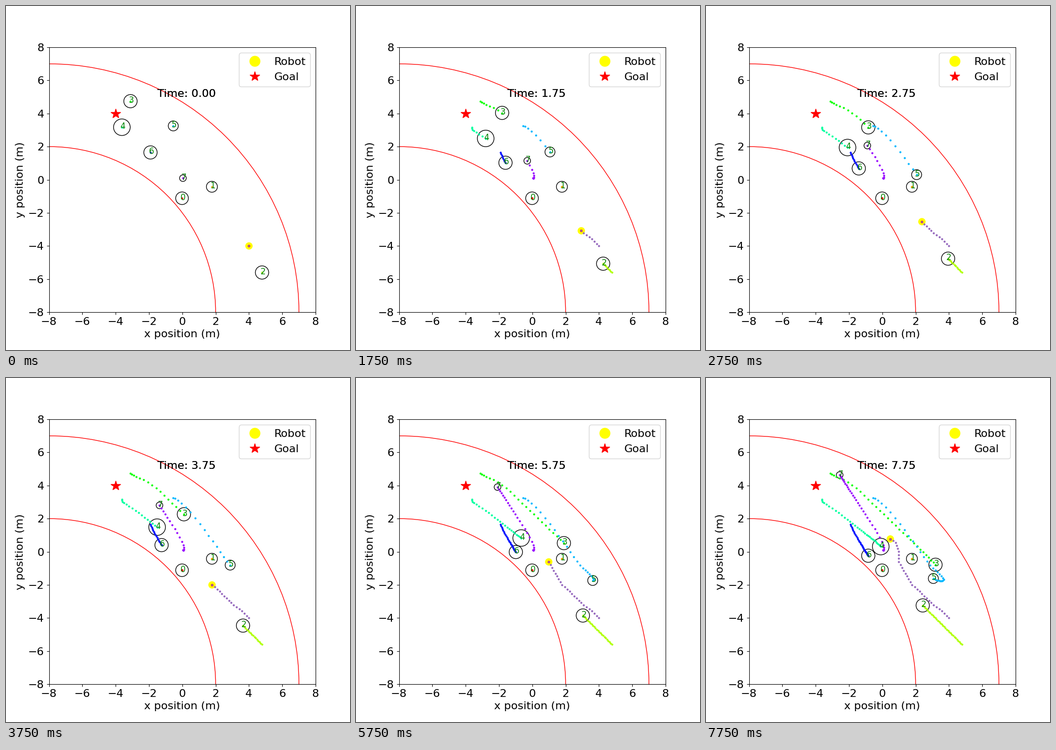
Animation, 700 px wide and 700 px high, one loop 8 s. Source, as a matplotlib script:

```python
import matplotlib.pyplot as plt
import numpy as np
from matplotlib.animation import FuncAnimation
from matplotlib.lines import Line2D
from matplotlib.patches import Circle

FRAMES, STEP = 32, 0.25
CLOCK = np.arange(FRAMES) * STEP
plt.rcParams["font.family"] = "DejaVu Sans"


def smooth(t, knots, values):
    """Cubic Hermite curve through the waypoints."""
    slope = np.gradient(values, knots, edge_order=2)
    i = np.clip(np.searchsorted(knots, t, side="right") - 1, 0, len(knots) - 2)
    h = knots[i + 1] - knots[i]
    u = (t - knots[i]) / h
    return ((1 + 2 * u) * (1 - u) ** 2 * values[i] + u * (1 - u) ** 2 * h * slope[i]
            + u ** 2 * (3 - 2 * u) * values[i + 1]
            + u ** 2 * (u - 1) * h * slope[i + 1])


def track(knots, px, py, curved=True):
    """Path in axis units from stage waypoints, one row for each step."""
    knots, px, py = (np.array(v, float) for v in (knots, px, py))
    if curved:
        px, py = smooth(CLOCK, knots, px), smooth(CLOCK, knots, py)
    else:
        px, py = np.interp(CLOCK, knots, px), np.interp(CLOCK, knots, py)
    return np.column_stack([(px - 358.75) * 16 / 542.5, (353.5 - py) * 16 / 539])


def straight(start, end):
    return track((0, CLOCK[-1]), *zip(start, end), curved=False)


knots = [0, 0.5, 1, 1.75, 2.75, 3.75, 4.75, 5.75, 7.75]
turn = knots[:7] + [5.5, 5.75, 6.25, 7.75]

paths = [
    straight((358.2, 391.2), (358.2, 391.2)),
    straight((419, 367.8), (419, 367.8)),
    straight((521, 542.3), (441, 462.8)),
    track(knots, [253.3, 259.5, 272.3, 297.3, 330.2, 362, 393.4, 423, 467],
          [193.7, 198.3, 203.6, 217.5, 247, 277.3, 307.7, 336, 380]),
    track(knots, [235.8, 237, 244.5, 263.9, 288, 307.5, 323.2, 336.2, 355.6],
          [246.7, 251.8, 257.3, 269.5, 288, 303.5, 316, 325.6, 343]),
    track(turn, [340.4, 350, 365.5, 394.7, 428.6, 456.2, 475, 483.5, 481.7, 478, 462.6],
          [244, 249, 262.5, 297, 343.2, 380.7, 399, 410, 412, 412.6, 408]),
    track(knots[::2], [294, 299.3, 310.9, 321.4, 330.2],
          [298, 309.8, 330.5, 347.9, 361.6]),
    track(knots, [360, 362, 361.4, 348.4, 328.3, 312.3, 298.6, 288, 272],
          [350.3, 349, 340, 315, 284, 259.2, 238.6, 222, 197.4]),
]
radii = [0.38, 0.33, 0.4, 0.4, 0.5, 0.3, 0.4, 0.2]

robot_path = track([0, 1, 1.5, 3.5, 3.75, 5.75, 6.5, 7.25, 7.75],
                   [494.4, 475, 463.2, 425, 419.2, 392.2, 392, 386, 375],
                   [488.3, 469.5, 462, 425, 421, 374.2, 353, 335, 327.5],
                   curved=False)

fig, ax = plt.subplots(figsize=(7, 7), dpi=100)
ax.tick_params(labelsize=16)
ax.set(xlim=(-8, 8), ylim=(-8, 8))
ax.set_xlabel("x position (m)", fontsize=16)
ax.set_ylabel("y position (m)", fontsize=16)

for radius in (10, 15):
    ax.add_patch(Circle((-8, -8), radius, fill=False, ec="red", lw=1))

goal = ax.plot([-4], [4], color="red", marker="*", ms=15, ls="None")[0]
robot_key = Line2D([], [], color="yellow", marker="o", ms=15, ls="None")
ax.legend([robot_key, goal], ["Robot", "Goal"], fontsize=16)

robot = ax.add_patch(Circle(robot_path[0], 0.2, color="yellow"))
heading = ax.plot([], [], color="red", ls="None", ms=3.6, mew=0.8)[0]


def trail(color):
    return ax.plot([], [], color=color, marker="o", ms=2, ls="None")[0]


hues = plt.get_cmap("hsv", 10)
humans = []
for n, (path, radius) in enumerate(zip(paths, radii)):
    ring = ax.add_patch(Circle(path[0], radius, fill=False, ec="black", lw=1))
    label = ax.text(0, 0, str(n), color="green", fontsize=12)
    humans.append((path, ring, label, trail(hues(n))))
robot_trail = trail("tab:purple")

# The clock is laid down twice, which darkens its edges.
clocks = [ax.text(-1.5, 5, "", fontsize=16) for _ in range(2)]


def update(frame):
    for path, ring, label, dots in humans:
        x, y = path[frame]
        ring.center = x, y
        label.set_position((x - 0.1, y - 0.1))
        dots.set_data(*path[:frame + 1].T)

    robot.center = robot_path[frame]
    robot_trail.set_data(*robot_path[:frame + 1].T)
    angle = 90
    if frame:
        dx, dy = robot_path[frame] - robot_path[frame - 1]
        angle = np.degrees(np.arctan2(dy, dx))
    heading.set_marker((4, 0, angle - 90))
    heading.set_data(*robot_path[frame:frame + 1].T)

    for clock in clocks:
        clock.set_text(f"Time: {CLOCK[frame]:.2f}")
    return []


anim = FuncAnimation(fig, update, frames=FRAMES, interval=250,
                     init_func=lambda: update(0), repeat=True, repeat_delay=0)
plt.show()
```
